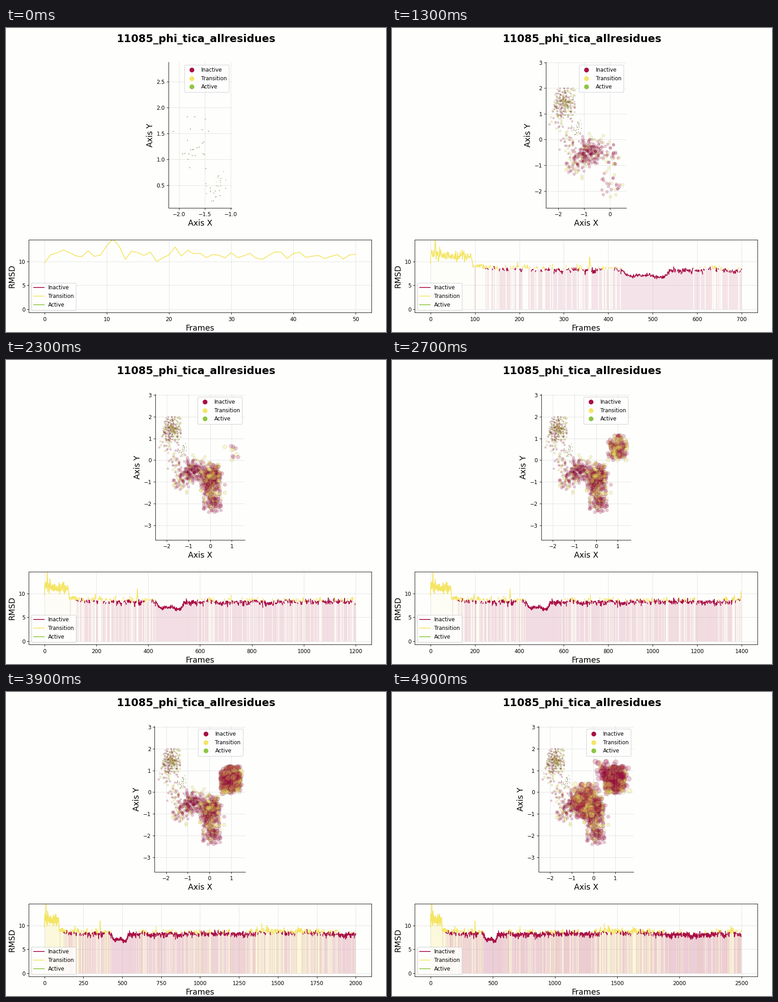
Write a matplotlib script that moves like this. It is 837 px wide and 669 px high and loops after 5 s.

```python
import numpy as np
import matplotlib.pyplot as plt
from matplotlib.animation import FuncAnimation
from matplotlib.colors import to_rgba
from matplotlib.lines import Line2D

WIDTH, HEIGHT, DPI = 837, 669, 83.7
FRAMES, STEP = 50, 50
TOTAL = FRAMES * STEP + 1
PAPER = "#fefefd"
COLORS = {"Inactive": "#a80f45", "Transition": "#f4e564", "Active": "#8ec63f"}
RED, YELLOW = COLORS["Inactive"], COLORS["Transition"]

# The walk settles in one group of clusters after another:
# last index of the stay, then clusters as (x, y, spread)
STAYS = [
    (26, [(-1.26, .47, .11)]),
    (51, [(-1.75, 1.3, .2)]),
    (250, [(-1.76, 1.47, .2)]),
    (290, [(-1.9, .9, .22)]),
    (401, [(-1.55, -.05, .2), (-1.3, -.85, .16), (-.58, -.35, .14)]),
    (570, [(-.85, -.52, .2)]),
    (650, [(-1.3, -1, .2), (-.45, -.45, .3)]),
    (920, [(0, -.8, .2), (.1, -1.88, .2)]),
    (950, [(.08, -1, .3)]),
    (1120, [(.02, -1, .22)]),
    (1190, [(.15, -.68, .2)]),
    (1760, [(.98, .57, .215)]),
    (2040, [(1, .55, .235)]),
    (2120, [(.4, 1, .16), (1.05, .6, .3)]),
    (TOTAL, [(-.45, -.5, .24), (-.3, -.35, .27)])]

plt.rcParams["font.family"] = "DejaVu Sans"
rng = np.random.default_rng(5)
index = np.arange(TOTAL)


def make_rmsd():
    """Settling level, slow and fast noise, and a few sharp peaks."""
    level = np.interp(index, [0, 92, 96, 130, 430, 440, 530, 540, 1350, 1370, 1650, 2060, 2240, 2290],
                      [11.4, 11.2, 9.3, 8.45, 8.3, 7, 6.9, 8.25, 8.25, 8.75, 8.6, 8, 8.1, 8.4])
    slow = np.convolve(rng.normal(0, 1.6, TOTAL), np.hanning(25) / 12, "same")
    fast = rng.normal(0, .3, TOTAL) + rng.exponential(.15, TOTAL) - .15
    noise = np.where(index < 93, 1.7 * fast, fast + .4 * slow)
    noise[(index > 435) & (index < 535)] *= .6
    for center, height in (11, 1.9), (196, 1.6), (358, 3):
        noise += height * np.exp(-abs(index - center) / 1.5)
    noise[0] = -1.75
    return level + noise


def make_points():
    """Points and the x range their clusters have reached so far."""
    start, centers = 0, []
    for end, clusters in STAYS:
        centers.append(rng.permutation(np.resize(clusters, (end - start, 3))))
        start = end
    x, y, spread = np.vstack(centers).T
    dx, dy = np.clip(rng.normal(size=(2, TOTAL)), -2, 2)
    low = np.minimum.accumulate(x - 2 * spread)
    high = np.maximum.accumulate(x + 2 * spread)
    return x + spread * dx, y + 1.3 * spread * dy, low, high


rmsd = make_rmsd()
xs, ys, x_low, x_high = make_points()
inactive = (rmsd + rng.normal(0, .25, TOTAL) < 8.5) & (index > 97)

is_red = inactive[:, None]
sizes = .045 * (index + 6)
faces = np.where(is_red, to_rgba(RED, .23), to_rgba(YELLOW, .3))
edges = np.where(is_red, to_rgba("#401020", .2), to_rgba("#4a4608", .22))
edges[~inactive, 3] = np.interp(index[~inactive], [0, 50, 300], [.75, .55, .22])

fig = plt.figure(figsize=(WIDTH / DPI, (HEIGHT + .01) / DPI), dpi=DPI, facecolor=PAPER)


def add_axes(left, top, right, bottom):
    return fig.add_axes([left / WIDTH, 1 - bottom / HEIGHT,
                         (right - left) / WIDTH, (bottom - top) / HEIGHT])


scatter_ax = add_axes(50.3, 75.4, 804.6, 395.6)
rmsd_ax = add_axes(50.3, 466, 804.6, 626.5)
fig.suptitle("11085_phi_tica_allresidues", fontsize=20, weight="bold")


def style(ax, xlabel, ylabel):
    ax.set_facecolor(PAPER)
    ax.grid(alpha=.35)
    ax.set_xlabel(xlabel, fontsize=15)
    ax.set_ylabel(ylabel, fontsize=15)


def add_legend(ax, loc, **line):
    handles = [Line2D([], [], color=c, label=name, **line) for name, c in COLORS.items()]
    ax.legend(handles=handles, loc=loc)


def draw_scatter(k, count):
    ax = scatter_ax
    ax.clear()
    style(ax, "Axis X", "Axis Y")
    ax.spines[["top", "right"]].set_visible(False)
    ax.scatter(xs[:count], ys[:count], s=sizes[:count], c=faces[:count],
               edgecolors=edges[:count], linewidths=.55)
    low, high = x_low[count - 1], x_high[count - 1]
    pad = .05 * (high - low)
    ax.set_xlim(low - pad, high + pad)
    ax.set_ylim(np.interp(k, [0, 7, 12, 18], [.06, -2.405, -2.45, -3.67]),
                np.interp(k, [0, 7, 12, 18], [2.874, 2.996, 2.998, 3.04]))
    ax.set_aspect("equal")
    add_legend(ax, "best", marker="o", ls="", markersize=8)


def draw_rmsd(k, count):
    ax = rmsd_ax
    ax.clear()
    style(ax, "Frames", "RMSD")
    t, values, low = index[:count], rmsd[:count], inactive[:count]
    red_alpha = np.interp(k, [7, 49], [.09, .2])
    yellow_alpha = np.interp(k, [0, 27, 31], [0, .05, .22])
    for mask, color, alpha in ((~low, YELLOW, yellow_alpha), (low, RED, red_alpha)):
        # Shade up to the next sample so that neighbouring states meet.
        shaded = mask | np.append(False, mask[:-1])
        ax.fill_between(t, 0, values, where=shaded, color=color, alpha=alpha, lw=0)
        ax.plot(t, np.where(mask, values, np.nan), color=color, lw=1.5)
    last = count - 1
    ax.set_xlim(-.05 * last, 1.05 * last)
    ax.set_ylim(-.69, 14.52)
    add_legend(ax, "lower left", lw=1.5)


def update(k):
    count = STEP * (k + 1) + 1
    draw_scatter(k, count)
    draw_rmsd(k, count)
    return []


animation = FuncAnimation(fig, update, frames=FRAMES, interval=100, repeat=True,
                          repeat_delay=0, init_func=lambda: [], blit=False)
plt.show()
```
